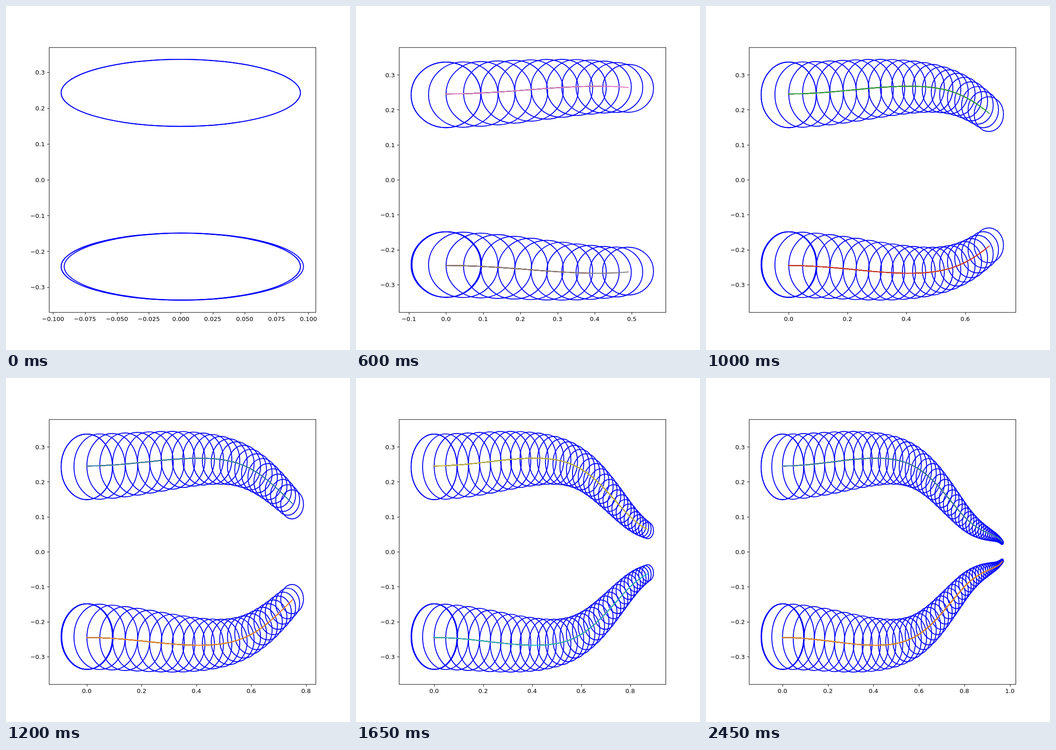
Recreate the animation shown at these times as an HTML page. Size 748 px wide and 748 px high, loop 2.5 s.

```html
<!DOCTYPE html>
<html lang="en">
<head>
<meta charset="utf-8">
<title>Circles along two mirrored paths</title>
<style>
  html, body { margin: 0; width: 100%; height: 100%; overflow: hidden; background: #fff; }
  svg { display: block; width: 100vw; height: 100vh; background: #fff; }
  text { font: 13.89px "DejaVu Sans", sans-serif; fill: #000; }
  .axis { fill: none; stroke: #000; stroke-width: 1.11; }
  .ring { fill: none; stroke: #00f; stroke-width: 2.083; }
  .path { fill: none; stroke-width: 2.083; stroke-linejoin: round; stroke-linecap: square; }
</style>
</head>
<body>
<svg id="plot" viewBox="0 0 800 800"></svg>
<script>
const FRAMES = 50, STEP = 50, GAP = 7;
const BOX = { l: 100, r: 720, t: 96, b: 712 };
const SHIFT = 0.0024;
const CYCLE = ['#1f77b4', '#ff7f0e', '#2ca02c', '#d62728', '#9467bd',
               '#8c564b', '#e377c2', '#7f7f7f', '#bcbd22', '#17becf'];

// Smooth cubic spline through evenly spaced keys.
// parity mirrors the curve about its start: 1 is even, -1 is odd.
function spline(keys, parity) {
  const end = keys.length - 1, bend = keys.map(() => 0);
  const mirror = (list, k) => k < 0 ? parity * list[-k] : list[k];
  for (let pass = 0; pass < 40; pass++) {
    for (let k = 0; k < end; k++) {
      const d2 = mirror(keys, k - 1) - 2 * keys[k] + keys[k + 1];
      bend[k] = (6 * d2 - mirror(bend, k - 1) - bend[k + 1]) / 4;
    }
  }
  return i => {
    const k = Math.min(Math.floor(i / GAP), end - 1), b = i / GAP - k, a = 1 - b;
    return a * keys[k] + b * keys[k + 1]
         + ((a ** 3 - a) * bend[k] + (b ** 3 - b) * bend[k + 1]) / 6;
  };
}

// The upper path, one key every GAP rings
const pathX = spline([0, .3118, .5477, .6988, .8086, .8921, .9418, .966], -1);
const pathY = spline([.2427, .2615, .2514, .1743, .0917, .054, .0393, .0263], 1);
const radius = spline([.0937, .0828, .0629, .0477, .0333, .0202, .0108, .006], 1);

const rings = Array.from({ length: FRAMES }, (_, i) =>
  ({ x: pathX(i), y: pathY(i), r: radius(i) }));

// The drawn path runs slightly outside the ring centres
const track = rings.map((p, i) => {
  const a = rings[Math.max(i - 1, 0)], b = rings[Math.min(i + 1, FRAMES - 1)];
  const dx = b.x - a.x, dy = b.y - a.y, d = Math.hypot(dx, dy);
  return { x: p.x - SHIFT * dy / d, y: p.y + SHIFT * dx / d };
});

function ticks(lo, hi) {
  const raw = (hi - lo) / 9, mag = 10 ** Math.floor(Math.log10(raw));
  const m = [1, 2, 2.5, 5, 10].find(s => s * mag >= raw), step = m * mag;
  let digits = 0;
  while (Math.abs(step * 10 ** digits - Math.round(step * 10 ** digits)) > 1e-6) digits++;
  const out = [];
  for (let n = Math.ceil(lo / step); n * step <= hi; n++) {
    const label = (n < 0 ? '\u2212' : '') + Math.abs(n * step).toFixed(digits);
    out.push({ v: n * step, label });
  }
  return out;
}

const snap = v => Math.floor(v + 0.5) + 0.5;

function frame(k) {
  const shown = rings.slice(0, k + 1), first = rings[0];
  const xMin = -first.r, xMax = Math.max(first.r + SHIFT, ...shown.map(p => p.x + p.r));
  const yMax = Math.max(...shown.map(p => p.y + p.r)) * 1.1;
  const pad = (xMax - xMin) * 0.05, lo = xMin - pad, hi = xMax + pad;
  const sx = (BOX.r - BOX.l) / (hi - lo), sy = (BOX.b - BOX.t) / (2 * yMax);
  const X = v => BOX.l + (v - lo) * sx;
  const Y = v => (BOX.t + BOX.b) / 2 - v * sy;

  const ring = (x, y, r) => `<ellipse class="ring" cx="${X(x).toFixed(2)}" cy="${Y(y).toFixed(2)}"`
    + ` rx="${(r * sx).toFixed(2)}" ry="${(r * sy).toFixed(2)}"/>`;
  const line = (n, side, color) => `<polyline class="path" stroke="${color}" points="`
    + track.slice(0, n + 1).map(p => X(p.x).toFixed(2) + ',' + Y(side * p.y).toFixed(2)).join(' ') + '"/>';

  let s = ring(SHIFT, -first.y, first.r);
  for (const p of [first, ...shown]) s += ring(p.x, p.y, p.r) + ring(p.x, -p.y, p.r);

  // Each step redraws both paths in the next two colours
  for (let n = 1; n <= k; n++) {
    const c = (2 * n + 2) % CYCLE.length;
    s += line(n, 1, CYCLE[c]) + line(n, -1, CYCLE[c + 1]);
  }

  let marks = `M${BOX.l + .5} ${BOX.t + .5}H${BOX.r + .5}V${BOX.b + .5}H${BOX.l + .5}Z`;
  for (const { v, label } of ticks(lo, hi)) {
    marks += `M${snap(X(v))} ${BOX.b + .5}v4.86`;
    s += `<text x="${X(v).toFixed(2)}" y="733" text-anchor="middle">${label}</text>`;
  }
  for (const { v, label } of ticks(-yMax, yMax)) {
    marks += `M${BOX.l + .5} ${snap(Y(v))}h-4.86`;
    s += `<text x="90.3" y="${(Y(v) + 5.5).toFixed(2)}" text-anchor="end">${label}</text>`;
  }
  return s + `<path class="axis" d="${marks}"/>`;
}

const plot = document.getElementById('plot');
const start = performance.now();
let current = -1;

function draw() {
  const k = Math.floor(Math.max(0, performance.now() - start) / STEP) % FRAMES;
  if (k !== current) plot.innerHTML = frame(current = k);
  requestAnimationFrame(draw);
}
draw();
</script>
</body>
</html>
```
